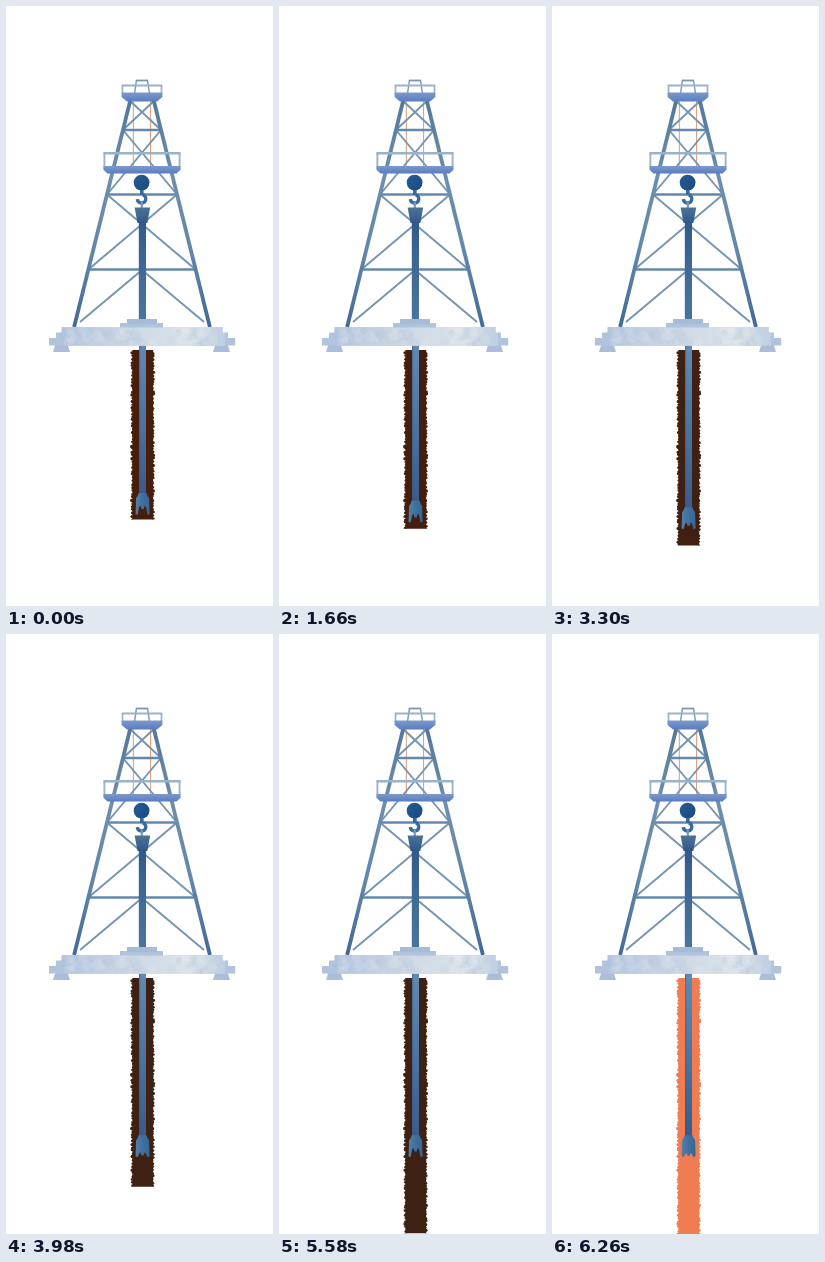
These frames come from a looping animation (267x600 px, 8 s). An HTML page with a canvas:

```html
<!DOCTYPE html>
<html lang="en">
<head>
<meta charset="utf-8">
<title>Drilling rig</title>
<style>
  html, body { margin: 0; width: 100%; height: 100%; overflow: hidden; background: #fff; }
  canvas { display: block; width: 267px; height: 600px; }
</style>
</head>
<body>
<canvas id="stage"></canvas>
<script>
const W = 267, H = 600, LOOP = 8000, STEP = 40, MID = 136;
const DRILL = 740, GUSH = 5900;              // when drilling and the oil strike begin
const DARK = [70, 30, 11], DEEP = [62, 33, 18], WET = [101, 68, 47], OIL = [240, 125, 82];

const canvas = document.getElementById('stage');
const ctx = canvas.getContext('2d');
const scale = window.devicePixelRatio || 1;
canvas.width = W * scale;
canvas.height = H * scale;

const clamp = (v, lo, hi) => Math.min(hi, Math.max(lo, v));
const mix = (a, b, k) => a.map((v, i) => v + (b[i] - v) * clamp(k, 0, 1));

function seeded(seed) {
  return () => (seed = (seed * 16807) % 2147483647) / 2147483647;
}

function fade(x0, y0, x1, y1, ...colors) {
  const g = ctx.createLinearGradient(x0, y0, x1, y1);
  colors.forEach((c, i) => g.addColorStop(i / (colors.length - 1), c));
  return g;
}

function line(x0, y0, x1, y1, width, color) {
  ctx.lineWidth = width;
  ctx.strokeStyle = color;
  ctx.beginPath();
  ctx.moveTo(x0, y0);
  ctx.lineTo(x1, y1);
  ctx.stroke();
}

function rect(x0, y0, x1, y1, color) {
  ctx.fillStyle = color;
  ctx.fillRect(x0, y0, x1 - x0, y1 - y0);
}

function disc(x, y, r, color) {
  ctx.fillStyle = color;
  ctx.beginPath();
  ctx.arc(x, y, r, 0, Math.PI * 2);
  ctx.fill();
}

// Fills a mirrored shape from its right outline, given as [distance from cx, y].
function symmetric(cx, color, ...side) {
  ctx.fillStyle = color;
  ctx.beginPath();
  side.forEach(([d, y]) => ctx.lineTo(cx + d, y));
  side.reverse().forEach(([d, y]) => ctx.lineTo(cx - d, y));
  ctx.fill();
}

function clipTo(x, y, w, h, draw) {
  ctx.save();
  ctx.beginPath();
  ctx.rect(x, y, w, h);
  ctx.clip();
  draw();
  ctx.restore();
}

const half = y => 11.6 + (y - 94) * 0.248;   // half the tower's width

function drawHole(bottom, color) {
  const rnd = seeded(71);
  clipTo(123, 344, 28, bottom - 344, () => {
    rect(126.3, 344, 147.2, H, color);
    for (let y = 346; y < H + 4; y += 3.2) {
      for (const x of [126.4, 147]) disc(x + rnd() - 0.5, y + rnd() * 2, 0.8 + rnd() * 1.1, color);
    }
  });
}

function drawBit(top, open) {
  const end = top + 21, notch = end - 4 - 6 * open, tooth = end - 1 - 5 * open;
  rect(133, 339, 140, top + 2, fade(0, 339, 0, top, '#6289b0', '#4d749f', '#3a5b8b'));
  rect(133, 339, 134.2, top, 'rgba(50,88,138,.45)');
  symmetric(136.6, fade(129, 0, 144, 0, '#5481ab', '#40709f', '#386493'),
    [4, top - 1], [5, top + 2], [6.5, top + 4], [7, end - 1], [5, end], [3.6, notch + 2],
    [2.2, notch], [1, tooth]);
}

function drawTower() {
  const brace = '#7494b3', bar = '#6488aa', levels = [95, 124, 188.5, 263.5];
  for (const x of [127.3, 144.6]) line(x, 95, x, 161, 1, '#dc9a72');

  for (const s of [-1, 1]) {
    levels.slice(1).forEach((y, i) => {
      line(MID + s * half(levels[i]), levels[i], MID - s * half(y), y, 1.9, brace);
    });
    line(MID, 264, MID + s * 62, 316, 1.9, brace);
  }
  for (const y of levels.slice(1)) line(MID - half(y), y, MID + half(y), y, 2.4, bar);

  rect(132.8, 215, 140, 318, fade(0, 215, 0, 318, '#33598a', '#426a97', '#4c749b'));

  for (const s of [-1, 1]) {
    const color = fade(0, 94, 0, 320, '#527799', '#6d8fac', '#6287aa', '#43699a');
    line(MID + s * half(93), 93, MID + s * half(321), 321, 3.8, color);
  }
}

function drawRails() {
  const rail = '#9bb2cb', frame = '#7897b8';
  line(129.8, 74.5, 142, 74.5, 1.8, frame);
  for (const s of [-1, 1]) {
    line(MID + s * 5.5, 74, MID + s * 7.4, 87, 1.4, frame);
    line(MID + s * 19.5, 79, MID + s * 19.5, 88, 1.7, rail);
    line(MID + s * 37.6, 147, MID + s * 37.6, 161, 1.9, rail);
  }
  line(MID - 20.3, 79.5, MID + 20.3, 79.5, 1.8, rail);
  line(MID - 38.6, 147.3, MID + 38.6, 147.3, 2.4, rail);

  const deck = (y, h, wide, narrow) => symmetric(MID, fade(0, y, 0, y + h, '#7d99c8', '#577dc2'),
    [wide, y], [wide, y + h / 2], [narrow, y + h]);
  deck(86.5, 9, 20.4, 15);
  deck(160, 7.5, 38.6, 34.5);
}

function drawHook() {
  const steel = '#376b9e';
  disc(135.6, 176.6, 7.9, fade(128, 169, 143, 185, '#265b91', '#174a80'));
  rect(134, 184, 137.6, 189, steel);
  ctx.lineWidth = 3.4;
  ctx.strokeStyle = steel;
  ctx.beginPath();
  ctx.arc(135.6, 192.8, 4.2, -1.3, Math.PI * 0.98);
  ctx.stroke();
  line(135.8, 196, 135.8, 202, 2.2, '#7898bb');
  symmetric(136.4, fade(0, 201, 0, 217, '#4d7399', '#315789'), [7.8, 201.5], [4.9, 217]);
}

function drawBase() {
  for (const x of [55.5, 215.5]) symmetric(x, '#abbdd8', [6, 338], [8.5, 346]);
  rect(43, 332, 229.2, 339.5, '#b1c3dc');
  rect(50, 326.5, 222, 336, '#b3c5dd');
  const slab = fade(54, 0, 218, 0, '#b2c4de', '#c3d1e3', '#d0dbe6', '#d8e1e8', '#c0cfe3');
  rect(55.5, 321, 216.8, 333, slab);
  rect(53, 327, 219, 339.8, slab);

  const rnd = seeded(19);
  clipTo(54, 321, 163, 18.5, () => {
    for (let i = 0; i < 60; i++) {
      disc(56 + rnd() * 160, 321 + rnd() * 18, 2 + rnd() * 4,
        i % 2 ? 'rgba(240,244,247,.12)' : 'rgba(160,182,211,.11)');
    }
  });

  rect(114, 317, 157, 321.5, '#b0c3dc');
  rect(121, 313, 151, 318, '#a5bbd7');
}

function holeBottom(t) {
  const slow = clamp((t - DRILL) / 1000, 0, 2.52), fast = Math.max(0, (t - DRILL) / 1000 - 2.52);
  return 513.5 + slow * 10.1 + fast * (16 + 4.3 * fast);
}

function soilColor(t) {
  const k = (t - GUSH) / 360;
  const soil = mix(mix(DARK, DEEP, (t - DRILL) / 3240), WET, k * 3);
  return `rgb(${mix(soil, OIL, k * 1.5 - 0.5).map(Math.round)})`;
}

// How deep the bit's notch looks as it turns; it settles during the strike.
function notchDepth(t) {
  if (t >= GUSH) return 0.1 + 0.5 * Math.sin(Math.PI * clamp((t - GUSH) / 360, 0, 1));
  const turn = t < 500 ? -1 : clamp((t - DRILL) / STEP, 0, 126);
  return 0.5 + 0.5 * Math.cos(turn / 12.2 * Math.PI * 2);
}

function render(time) {
  const t = Math.max(0, Math.floor((time + STEP / 2) / STEP) * STEP - STEP / 2);
  ctx.setTransform(scale, 0, 0, scale, 0, 0);
  rect(0, 0, W, H, '#fff');
  drawHole(holeBottom(t), soilColor(t));
  drawBit(488 + 8.5 * clamp((t - DRILL) / 1000, 0, 1.68), notchDepth(t));
  drawTower();
  drawRails();
  drawHook();
  drawBase();
}

const start = performance.now();
function tick() {
  render((performance.now() - start) % LOOP);
  requestAnimationFrame(tick);
}
tick();
</script>
</body>
</html>
```
